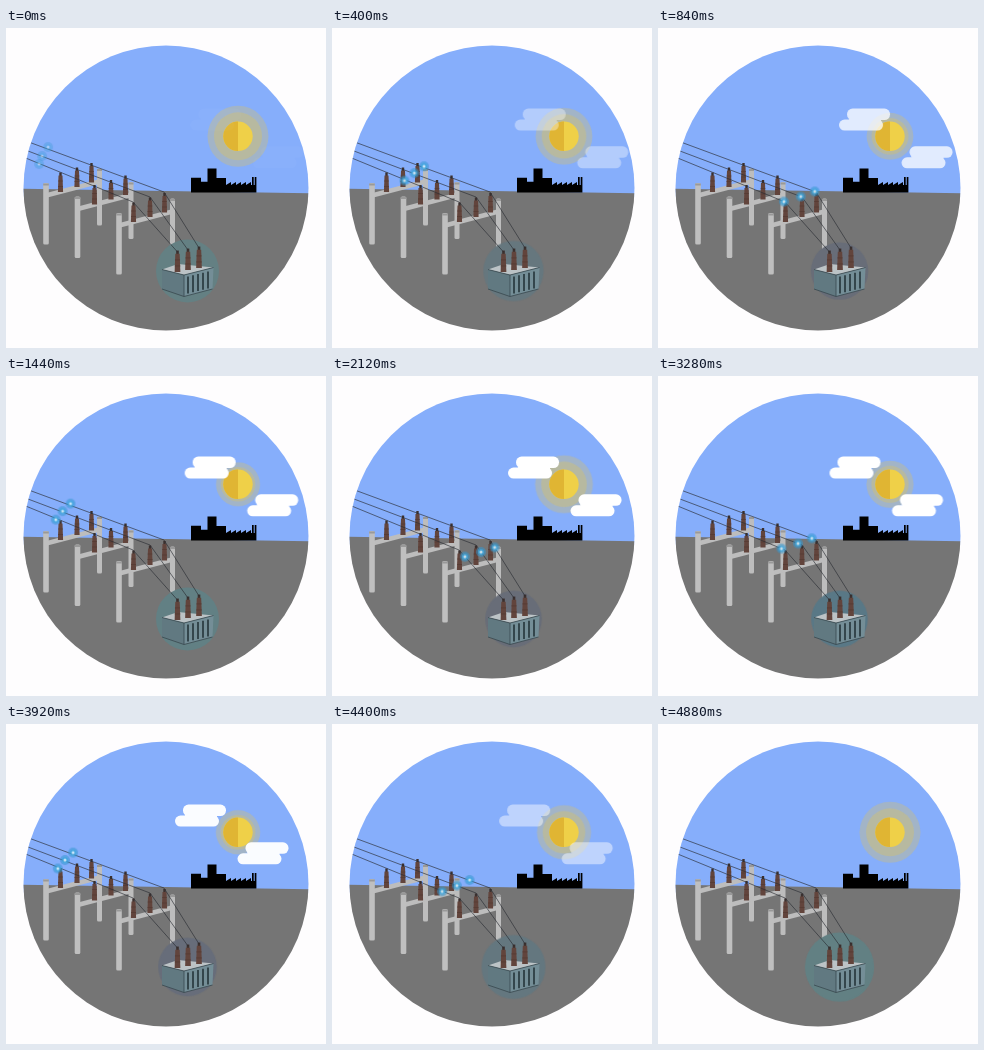
These frames come from a looping animation (320x320 px, 4.92 s). An HTML page:

```html
<!DOCTYPE html>
<html lang="en">
<head>
<meta charset="utf-8">
<title>Substation</title>
<style>
html, body { margin: 0; width: 100%; height: 100%; overflow: hidden; background: #fefdfe; }
svg { display: block; width: 100vw; height: 100vh; }

.halo { transform-origin: 232px 108.3px; animation: pulse 1230ms cubic-bezier(.37, 0, .63, 1) infinite alternate; }
@keyframes pulse { from { transform: scale(1); } to { transform: scale(.7); } }

.clouds { animation: drift 4920ms linear infinite, fade 4920ms linear infinite; }
@keyframes drift { from { transform: translateX(8.3px); } to { transform: translateX(-10.9px); } }
@keyframes fade {
  0% { opacity: .03; }
  23%, 79% { opacity: 1; }
  98.5%, 100% { opacity: 0; }
}

.glow { transform-origin: 181.5px 243px; animation: glow 4920ms linear infinite; }
@keyframes glow {
  0%, 100% { transform: scale(1); fill: #648083; }
  17% { transform: scale(.91); fill: #686d78; }
  29.3% { transform: scale(1); fill: #628084; }
  43.1% { transform: scale(.9); fill: #686d78; }
  50% { transform: scale(1); fill: #628084; }
  66.7% { transform: scale(.9); fill: #597886; }
  79.7% { transform: scale(.93); fill: #676d7a; }
  99.2% { transform: scale(1.1); fill: #628083; }
}

.spark { animation: flow 1230ms linear infinite; }
@keyframes flow {
  0% { transform: translate(var(--a)); opacity: .5; }
  17.9% { transform: translate(var(--b)); opacity: .9; }
  69.1% { transform: translate(var(--c)); }
  91% { opacity: .9; }
  94.3%, 100% { transform: translate(var(--d)); opacity: 0; }
}
</style>
</head>
<body>
<svg viewBox="0 0 320 320">
  <defs>
    <clipPath id="disc"><circle cx="160" cy="160" r="142.5"/></clipPath>
    <g id="insulator">
      <path d="M-1.2-19.500h2.4V-16h-2.4z" fill="#3c302e"/>
      <path d="M-2-16.500h4L2.600 0h-5.200z" fill="#62443c"/>
      <path d="M-2.300-11h4.600M-2.500-5.500h5" stroke="#553a33" stroke-width=".8"/>
    </g>
    <g id="trio">
      <use href="#insulator" x="14.500" y="9"/>
      <use href="#insulator" x="31" y="4"/>
      <use href="#insulator" x="45.500" y="-.5"/>
    </g>
    <g id="gantry">
      <rect x="51" y="-14.500" width="5" height="57" rx="1.500" fill="#bdbdbd"/>
      <path d="M0 12.500 53.500-1.500" stroke="#bdbdbd" stroke-width="4.600"/>
      <rect x="-2.800" width="5.600" height="61.500" rx="1.500" fill="#bfbfbf"/>
      <path d="M-2.800 1.500h5.600M51-13h5" stroke="#999" stroke-width="2"/>
    </g>
    <g id="cloud" fill="#fff">
      <rect x="8" width="43" height="11.500" rx="5.500"/>
      <rect y="11" width="44" height="11" rx="5.500"/>
      <rect x="10" y="6" width="32" height="10"/>
    </g>
    <g id="bolt">
      <circle r="5" fill="#3597d0" opacity=".6"/>
      <circle r="3" fill="#3fa6dc"/>
      <circle r="1.500" fill="#d3edfa"/>
    </g>
  </defs>

  <g clip-path="url(#disc)">
    <path d="M0 0h320v170H0z" fill="#86aefb"/>
    <path d="M0 160.500 320 165.500V320H0z" fill="#757575"/>

    <g class="halo" fill="#e3c350">
      <circle cx="232" cy="108.300" r="30.500" opacity=".3"/>
      <circle cx="232" cy="108.300" r="24" opacity=".32"/>
    </g>
    <circle cx="232" cy="108.300" r="14.700" fill="#efd048"/>
    <path d="M232 93.600a14.700 14.700 0 0 0 0 29.400z" fill="#e0b533"/>

    <g class="clouds">
      <use href="#cloud" x="176" y="80.600"/>
      <use href="#cloud" x="238.500" y="118.300"/>
    </g>

    <path d="M185 164.500V149.700h10v4h6.500V140.500h9v9.500h9.500v7l5-3v3l5-3v3l5-3v3l5-3v3l5-3v3h1v-8h1.700v8h1v-8h1.700v15.500z"/>

    <use href="#gantry" x="40" y="155"/>
    <use href="#trio" x="40" y="155"/>
    <use href="#gantry" x="71.500" y="168.500"/>
    <use href="#trio" x="74" y="167.500"/>
    <use href="#gantry" x="113" y="185"/>
    <use href="#trio" x="113" y="185"/>

    <circle class="glow" cx="181.500" cy="243" r="31.500"/>

    <path d="M156 241.500 172 236l35.500 3.500L178 247z" fill="#bcc3c6"/>
    <path d="M156 241.500 178 247v21.500l-22-7.500z" fill="#617981"/>
    <path d="M178 247l29.500-7.500-1 21.500-28.500 7.500z" fill="#748e97"/>
    <path d="M182 248.500v17M187 247.300v17M192 246v17M197 244.800v17M202 243.500v17" stroke="#34464c" stroke-width="2"/>
    <path d="M156 241.500 178 247l29.500-7.500M178 247v21.500M156 261l22 7.500 28.500-7.500" fill="none" stroke="#39484e" stroke-width=".8"/>
    <use href="#insulator" transform="translate(193 240) scale(1.1)"/>
    <use href="#insulator" transform="translate(182 242) scale(1.1)"/>
    <use href="#insulator" transform="translate(171.500 244) scale(1.1)"/>

    <g fill="none" stroke="#2b2e34" stroke-width=".65">
      <path d="M20 113 158 164l35 56M18 121.500 144 169l38 53M16 128.500 127 174l44.500 50"/>
    </g>

    <use class="spark" href="#bolt" style="--a:42px,119px;--b:65.5px,128px;--c:158px,164px;--d:193px,220px"/>
    <use class="spark" href="#bolt" style="--a:36px,128px;--b:57.5px,135.5px;--c:144px,169px;--d:182px,222px"/>
    <use class="spark" href="#bolt" style="--a:33px,136px;--b:50.5px,144px;--c:127px,174px;--d:171.5px,224px"/>
  </g>
</svg>
</body>
</html>
```
